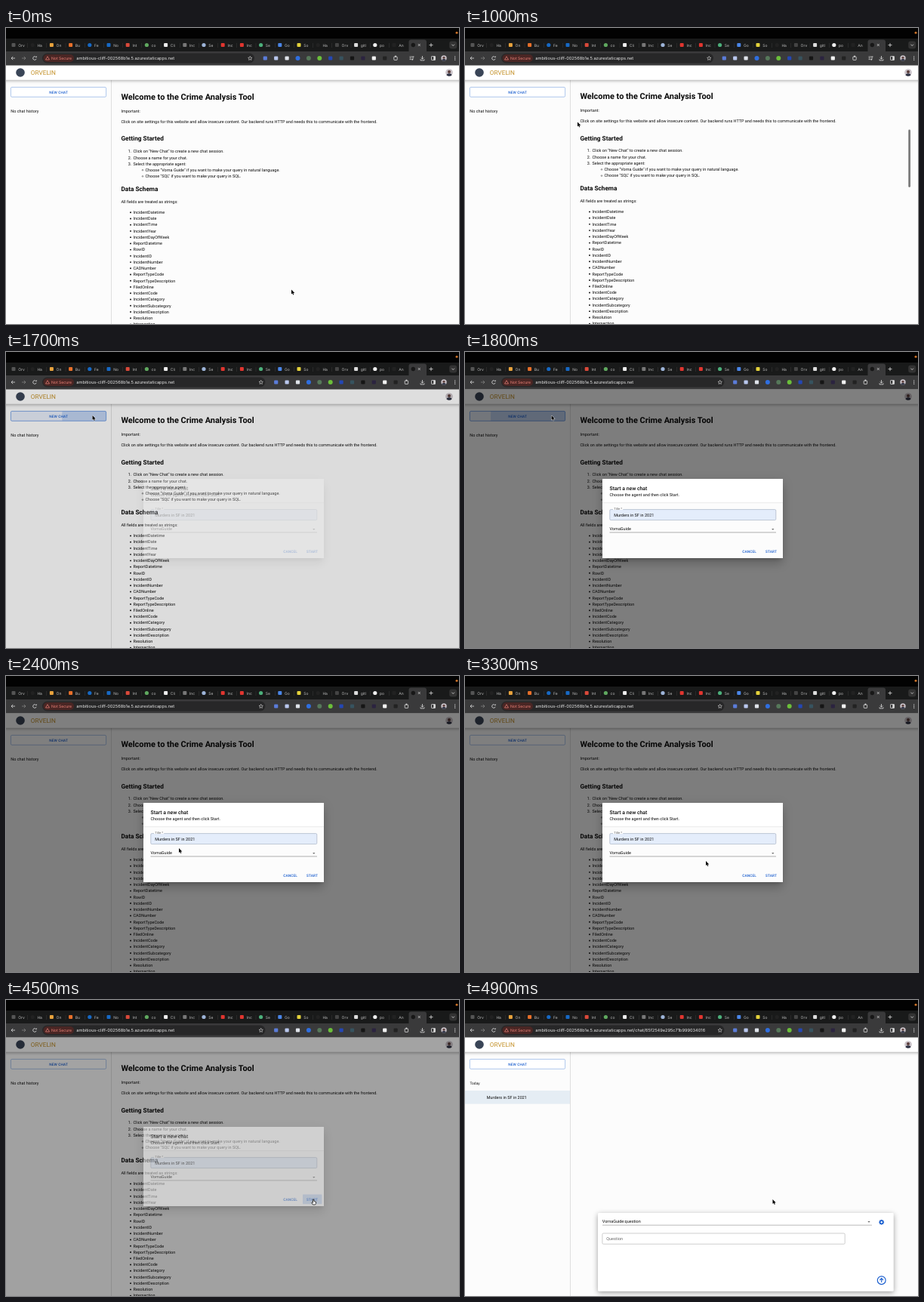
An HTML page with a canvas that plays this animation: 600x392 px, repeating every 5 s.

```html
<!DOCTYPE html>
<html lang="en">
<head>
<meta charset="utf-8">
<title>Chat walkthrough</title>
<style>
  html, body { margin: 0; width: 100%; height: 100%; overflow: hidden; background: #fcfcfc; }
  canvas { display: block; width: 600px; height: 392px; }
</style>
</head>
<body>
<canvas id="stage" width="600" height="392"></canvas>
<script>
const LOOP = 5000, STEP = 100, W = 600, H = 392;
const BLUE = '#1b5fcf', INK = '#0a0a0a', BODY = 5.49, LINE = 8.235;
const AGENT = 'VornaGuide', CHAT_TITLE = 'Murders in SF in 2021';

const screen = document.getElementById('stage').getContext('2d');
const layerCanvas = document.createElement('canvas');
layerCanvas.width = W;
layerCanvas.height = H;
const layer = layerCanvas.getContext('2d');
let ctx = screen;

// Drawing helpers
function text(str, x, y, { size = BODY, weight = 400, color = INK, font = 'Roboto', align = 'left', spacing = 0 } = {}) {
  ctx.font = `${weight} ${size}px ${font}, sans-serif`;
  ctx.textRendering = 'geometricPrecision';
  ctx.letterSpacing = `${spacing}px`;
  ctx.textAlign = align;
  ctx.fillStyle = color;
  ctx.fillText(str, x, y + size * 0.36);
}
function rect(x, y, w, h, color) {
  ctx.fillStyle = color;
  ctx.fillRect(x, y, w, h);
}
function box(x, y, w, h, r, fill, stroke, width = 0.7) {
  ctx.beginPath();
  ctx.roundRect(x, y, w, h, r);
  paint(fill, stroke, width);
}
function circle(x, y, r, fill, stroke, width = 0.8) {
  ctx.beginPath();
  ctx.arc(x, y, r, 0, Math.PI * 2);
  paint(fill, stroke, width);
}
function poly(points, fill, stroke, width = 0.8, closed = true) {
  ctx.beginPath();
  points.forEach(([x, y]) => ctx.lineTo(x, y));
  if (closed) ctx.closePath();
  paint(fill, stroke, width);
}
function line(points, color, width) {
  poly(points, null, color, width, false);
}
function paint(fill, stroke, width) {
  if (fill) { ctx.fillStyle = fill; ctx.fill(); }
  if (stroke) { ctx.strokeStyle = stroke; ctx.lineWidth = width; ctx.stroke(); }
}
function shadowed(blur, dy, alpha, draw) {
  ctx.save();
  ctx.shadowBlur = blur;
  ctx.shadowOffsetY = dy;
  ctx.shadowColor = `rgba(0,0,0,${alpha})`;
  draw();
  ctx.restore();
}
function clipped(x, y, w, h, draw) {
  ctx.save();
  ctx.beginPath();
  ctx.rect(x, y, w, h);
  ctx.clip();
  draw();
  ctx.restore();
}
function buttonLabel(str, x, y) {
  text(str, x, y, { size: 4.8, weight: 500, color: BLUE, align: 'center', spacing: 0.12 });
}
function dropArrow(x, y) {
  poly([[x - 1.7, y - 0.8], [x + 1.7, y - 0.8], [x, y + 0.9]], '#666');
}
function portrait(x, y, r) {
  ctx.save();
  circle(x, y, r, '#c9c2c8');
  ctx.clip();
  circle(x, y - r * 0.2, r * 0.42, '#5a3d3a');
  circle(x, y + r * 1.05, r * 0.8, '#2c3142');
  ctx.restore();
}

// Timing helpers
const clamp = v => Math.min(1, Math.max(0, v));
const ease = p => p * p * (3 - 2 * p);
const progress = (t, from, to) => clamp((t - from) / (to - from));

const cursorPath = [
  [0, 378, 346.5], [800, 150, 125], [1000, 149, 124.5], [1500, 114.5, 84], [1800, 114.5, 84],
  [2400, 229, 228], [2700, 229, 228], [3300, 319, 245], [3400, 319, 245],
  [3800, 372, 275], [4100, 407, 264], [LOOP, 407.5, 264]
];
function cursorAt(t) {
  const i = cursorPath.findIndex(key => key[0] > t);
  const [t0, x0, y0] = cursorPath[i - 1], [t1, x1, y1] = cursorPath[i];
  const p = ease(progress(t, t0, t1));
  return [x0 + (x1 - x0) * p, y0 + (y1 - y0) * p];
}

// Browser window
const tabs = [
  ['Orv', '#555'], ['Ha', '#222'], ['On', '#e8a33d'], ['Bu', '#e8702a'], ['Fe', '#1769c4'], ['No', '#1769c4'],
  ['Int', '#d9493a'], ['co', '#5fa85f'], ['Cli', '#eee'], ['Inc', '#777'], ['Se', '#9db4d8'], ['Inc', '#e0352f'],
  ['Inc', '#e0352f'], ['Se', '#4caf7a'], ['Go', '#4a86e8'], ['So', '#e3d13a'], ['Ha', '#222'], ['Orv', '#444'],
  ['gitl', '#ddd'], ['po', '#eee'], ['An', '#222']
];
const extensions = ['#5b7cd9', '#b9c7ee', '#dfe3ea', '#2f6fe0', '#56785a', '#6bbf3a', '#2447b5', '#37535f',
  '#151515', '#2b2340', '#f2f2f2', '#222'];

function drawTabs() {
  rect(0, 0, W, 14, '#020202');
  rect(0, 14, W, 17, '#191a1a');
  circle(597, 6.2, 1.5, '#cf7428');
  box(533.5, 15.5, 23.5, 18, 3, '#3a3a3b');
  tabs.forEach(([label, color], i) => {
    const x = 10 + i * 25.2;
    if (i % 3 === 1) circle(x, 22.5, 2.6, color);
    else box(x - 2.5, 20, 5, 5, 1, color);
    text(label, x + 6.2, 22.7, { size: 5, color: '#bdbdbd', font: 'Inter' });
    if (i < 20) rect(x + 18.4, 20, 0.4, 6, '#444');
  });
  circle(539.3, 22.5, 2.7, '#171717');
  line([[545.8, 21], [548.8, 24]], '#ddd', 0.7);
  line([[548.8, 21], [545.8, 24]], '#ddd', 0.7);
  line([[560.5, 22.6], [565.5, 22.6]], '#ddd', 0.8);
  line([[563, 20.1], [563, 25.1]], '#ddd', 0.8);
  box(587.2, 17.6, 10, 10, 3, '#333');
  line([[590.4, 21.7], [592.2, 23.5], [594, 21.7]], '#ddd', 0.8);
}

function drawArrow(x, dir, color) {
  line([[x - 2.5, 40], [x + 2.5, 40]], color, 0.8);
  line([[x + dir * 0.3, 37.8], [x + dir * 2.5, 40], [x + dir * 0.3, 42.2]], color, 0.8);
}

function drawToolbar(mediaIcon, path) {
  const shift = mediaIcon ? 0 : 14.4;
  rect(0, 31, W, 18.5, '#3a3a3b');
  drawArrow(9.5, -1, '#ddd');
  drawArrow(23.5, 1, '#858585');
  ctx.beginPath();
  ctx.arc(38, 40, 2.3, 0.3, 5.3);
  paint(null, '#ddd', 0.8);
  poly([[38.8, 39], [40.7, 39], [40.7, 37]], '#ddd');

  box(48, 33.5, 281 + shift, 13, 6.5, '#272728');
  box(49.5, 35, 40.5, 10, 5, '#4a2624');
  poly([[55, 37.7], [57.5, 42], [52.5, 42]], null, '#f0857b', 0.7);
  text('Not Secure', 60, 40, { size: 5.1, color: '#f0857b', font: 'Inter' });
  text('ambitious-cliff-002568b1e.5.azurestaticapps.net' + path, 93.3, 40, { size: 5.66, color: '#e6e6e6', font: 'Inter' });

  const star = Array.from({ length: 10 }, (_, i) => {
    const a = i * Math.PI / 5 - Math.PI / 2, r = i % 2 ? 1.3 : 2.8;
    return [323.3 + shift + r * Math.cos(a), 40.2 + r * Math.sin(a)];
  });
  poly(star, null, '#ddd', 0.6);
  extensions.forEach((color, i) => {
    const x = 343.3 + shift + i * 14.4;
    if (i > 2 && i < 6) circle(x, 40, 3, color);
    else box(x - 2.6, 37.4, 5.2, 5.2, 1, color);
  });
  box(513.8 + shift, 38, 4.4, 4.4, 0.6, null, '#ddd', 0.8);
  circle(516 + shift, 37.4, 1, '#ddd');
  if (mediaIcon) {
    [38, 39.8, 41.6].forEach((y, i) => line([[534.5, y], [i ? 537 : 539.5, y]], '#ddd', 0.7));
    line([[539, 41.5], [539, 38], [540.6, 38]], '#ddd', 0.7);
    circle(538.3, 41.7, 0.9, '#ddd');
  }
  line([[551.5, 37], [551.5, 41]], '#ddd', 0.8);
  line([[549.6, 39.3], [551.5, 41.2], [553.4, 39.3]], '#ddd', 0.8);
  line([[549, 41.4], [549, 42.9], [554, 42.9], [554, 41.4]], '#ddd', 0.8);
  box(563.5, 37.5, 5, 5, 0.6, null, '#ddd', 0.8);
  rect(566.3, 37.5, 2.2, 5, '#ddd');
  portrait(580, 40, 3.7);
  [37.8, 40, 42.2].forEach(y => circle(594.7, y, 0.65, '#ddd'));
}

// Web page
function drawHeader() {
  shadowed(4, 1, 0.32, () => rect(-5, 49.5, W + 10, 19.3, '#fff'));
  circle(19, 59, 5.8, '#3a4557');
  text('ORVELIN', 32.8, 59.2, { size: 8.24, color: '#c4922a' });
  portrait(587, 59, 4.8);
}

function drawSidebar(t, inChat) {
  rect(139, 69, 0.8, H - 69, '#d8d8d8');
  const hover = t >= 1400 && t < 1900;
  box(6.4, 78.4, 126.2, 12.9, 1.5, hover ? 'rgba(27,95,207,.09)' : '#fff', hover ? '#4f86dc' : '#8fb1e6', 0.7);
  if (t >= 1600 && t < 1900) {
    clipped(6.4, 78.4, 126.2, 12.9, () =>
      circle(115, 85, 10 + 31 * progress(t, 1600, 1700) + 40 * progress(t, 1700, 1800), 'rgba(27,95,207,.18)'));
  }
  buttonLabel('NEW CHAT', 69.6, 85);
  if (!inChat) {
    text('No chat history', 6.3, 110);
    return;
  }
  text('Today', 6.4, 110.7, { size: 4.9 });
  rect(0, 120, 139, 17.6, '#e5edf4');
  text(CHAT_TITLE, 28.8, 129);
}

const steps = ['Click on "New Chat" to create a new chat session.', 'Choose a name for your chat.',
  'Select the appropriate agent:'];
const choices = ['Choose "Vorna Guide" if you want to make your query in natural language.',
  'Choose "SQL" if you want to make your query in SQL.'];
const fields = ['IncidentDatetime', 'IncidentDate', 'IncidentTime', 'IncidentYear', 'IncidentDayOfWeek',
  'ReportDatetime', 'RowID', 'IncidentID', 'IncidentNumber', 'CADNumber', 'ReportTypeCode',
  'ReportTypeDescription', 'FiledOnline', 'IncidentCode', 'IncidentCategory', 'IncidentSubcategory',
  'IncidentDescription', 'Resolution', 'Intersection'];

function drawWelcome(t) {
  ctx.save();
  ctx.translate(0, -0.8 * progress(t, 700, 900));
  const heading = { size: 8.24, weight: 700 };
  text('Welcome to the Crime Analysis Tool', 152.4, 91, { size: 10.95, weight: 700 });
  text('Important:', 152.4, 110.3);
  text('Click on site settings for this website and allow insecure content. Our backend runs HTTP and needs ' +
    'this to communicate with the frontend.', 152.4, 124);
  text('Getting Started', 152.4, 146.4, heading);
  steps.forEach((step, i) => {
    text(`${i + 1}.`, 166.3, 163.3 + i * LINE, { align: 'right' });
    text(step, 168.5, 163.3 + i * LINE);
  });
  choices.forEach((choice, i) => {
    const y = 188 + i * LINE;
    circle(181, y + 0.2, 0.85, null, INK, 0.4);
    text(choice, 184.5, y);
  });
  text('Data Schema', 152.4, 213.3, heading);
  text('All fields are treated as strings:', 152.4, 230.3);
  fields.forEach((field, i) => {
    const y = 244 + i * LINE;
    circle(165, y + 0.2, 0.95, INK);
    text(field, 168.5, y);
  });
  ctx.restore();
  if (t >= 700 && t < 1400) box(587.2, 134.5, 2.8, 76.5, 1.4, '#7d7d7d');
}

function drawChatPanel(ready) {
  shadowed(7, 2, 0.38, () => box(176, 282, 391.7, 103.7, 1.4, '#fff'));
  rect(182, 297.8, 357, 0.6, '#8c8c8c');
  dropArrow(535, 293.8);
  circle(551.7, 294.2, 2.1, null, BLUE, 1.7);
  for (let i = 0; i < 8; i++) {
    const a = i * Math.PI / 4;
    circle(551.7 + 2.9 * Math.cos(a), 294.2 + 2.9 * Math.sin(a), 0.6, BLUE);
  }
  circle(551.7, 371.2, 5.4, null, BLUE, 1.2);
  line([[551.7, 374], [551.7, 368.8]], BLUE, 1.1);
  line([[549.4, 371], [551.7, 368.6], [554, 371]], BLUE, 1.1);
  if (!ready) return;
  text(AGENT + ':question', 181.8, 292.6);
  box(181.9, 309, 321.3, 14.2, 1.4, '#fff', '#b9b9b9', 0.7);
  text('Question', 187.3, 316, { color: '#666' });
}

function drawDialog(t) {
  // Layered elevation: a tight shadow under the edge and two wide soft ones.
  const sheet = spread => () =>
    box(182 - spread, 168 - spread, 239 + 2 * spread, 105 + 2 * spread, 1.4, '#fff');
  ctx.save();
  ctx.globalCompositeOperation = 'source-over';
  shadowed(15.8, 3.1, 0.12, sheet(0));
  shadowed(13, 8.2, 0.14, sheet(0));
  shadowed(5.1, 3.8, 0.2, sheet(-2.4));
  ctx.restore();
  sheet(0)();
  rect(182, 200, 239, 73, '#fcfcfc');
  rect(182, 199.5, 239, 0.6, '#dcdcdc');
  text('Start a new chat', 191.5, 180.2, { size: 6.86, weight: 500 });
  text('Choose the agent and then click Start.', 191.5, 189.2);
  box(191.8, 208.6, 220, 14, 1.4, '#e4edfb', '#a8b3c4', 0.7);
  rect(196, 207.5, 13.2, 1.6, '#fcfcfc');
  text('Title *', 197.2, 208, { size: 4.12, color: '#666' });
  text(CHAT_TITLE, 197.2, 215.6);
  text(AGENT, 191.5, 233.6);
  rect(191.5, 238.6, 220.5, 0.7, '#8c8c8c');
  dropArrow(407.8, 234.8);
  if (t >= 4100) box(393, 257.4, 25.4, 12.8, 1.4, 'rgba(27,95,207,.07)');
  if (t >= 4400) {
    clipped(393, 257.4, 25.4, 12.8, () =>
      circle(408, 265, 6 + 14 * progress(t, 4400, 4500), 'rgba(27,95,207,.18)'));
  }
  buttonLabel('CANCEL', 376.6, 264);
  buttonLabel('START', 405.5, 264);
}

function drawModal(t) {
  const shown = ease(progress(t, 1650, 1800));
  const hidden = progress(t, 4400, 4600);
  if (!shown) return;
  rect(0, 49.5, W, H - 49.5, `rgba(0,0,0,${0.5 * shown * (1 - 0.55 * hidden)})`);
  ctx = layer;
  ctx.clearRect(0, 0, W, H);
  drawDialog(t);
  ctx = screen;
  ctx.globalAlpha = shown * (1 - hidden);
  ctx.drawImage(layerCanvas, 0, 0);
  ctx.globalAlpha = 1;
}

function drawCursor(t) {
  const [x, y] = cursorAt(t);
  ctx.save();
  ctx.translate(x, y);
  ctx.lineJoin = 'round';
  if (t >= 4100 && t < 4600) {
    poly([[-0.6, 0], [0.6, 0], [0.8, 2.6], [3.4, 3.4], [3.2, 5.6], [2.4, 7], [-0.8, 7], [-2.5, 4.3], [-1.8, 3.7], [-0.7, 4.5]],
      '#fff', '#111', 0.8);
  } else {
    const arrow = [[0, 0], [0, 6], [1.4, 4.8], [2.3, 7], [3.3, 6.6], [2.4, 4.5], [4.3, 4.4]];
    poly(arrow, null, '#fff', 0.9);
    poly(arrow, '#000');
  }
  ctx.restore();
}

function render(t) {
  const inChat = t >= 4600;
  rect(0, 0, W, H, '#fcfcfc');
  drawSidebar(t, inChat);
  if (inChat) drawChatPanel(t >= 4900);
  else drawWelcome(t);
  drawHeader();
  if (!inChat) drawModal(t);
  drawTabs();
  drawToolbar(t < 1300, inChat ? '/chat/65f2549e295c71b999034016' : '');
  drawCursor(t);
}

// The picture advances ten times a second.
const start = performance.now();
function tick() {
  const t = (performance.now() - start) % LOOP;
  render(Math.floor(t / STEP) * STEP);
  requestAnimationFrame(tick);
}
tick();
</script>
</body>
</html>
```
